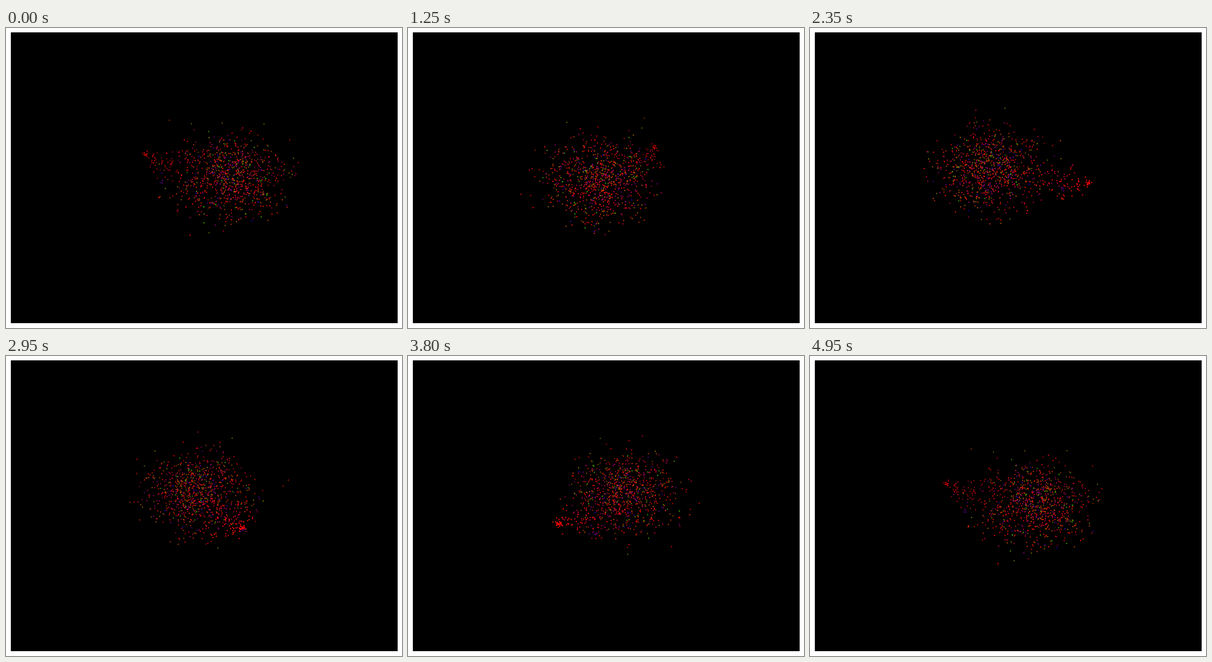
A matplotlib script that plays this animation: 819 px wide and 619 px high, repeating every 5 s.

```python
import numpy as np
import matplotlib.pyplot as plt
from matplotlib.animation import FuncAnimation
from matplotlib.patches import Rectangle

W, H, DPI = 819, 619, 100
FRAMES, INTERVAL = 100, 50
CENTER_X, CENTER_Y = 420, 306
ELEV = np.radians(22)
CAMERA = 2500  # camera distance in pixels

rng = np.random.default_rng(11)


def blob(n, center, sigma, hue, hue_sigma, shell=(0, 2.6)):
    """Gaussian blob of n points (x, y, z, hue) within a shell in sigmas."""
    unit = rng.normal(size=(400 * n if shell[0] else 3 * n, 3))
    radius = np.linalg.norm(unit, axis=1)
    unit = unit[(radius >= shell[0]) & (radius < shell[1])][:n]
    hues = np.clip(rng.normal(hue, hue_sigma, len(unit)), 0.08, 0.88)
    return np.column_stack([unit * sigma + center, hues])


CLOUD = (42, -25, 10), (56, 56, 42), .5, .17

points = np.vstack([
    blob(870, *CLOUD),
    blob(16, *CLOUD, shell=(2.6, 3)),
    # the tight tip and the loose arm that joins it to the cloud
    blob(14, (-135, 95, 10), 3.5, .5, .01),
    blob(20, (-122, 88, 4), (13, 13, 11), .49, .03),
    blob(40, (-85, 52, 10), (26, 24, 17), .43, .08),
    blob(4, (-82, 106, -11), 4, .52, .02),
    blob(5, (-100, 28, -23), (4, 4, 3), .2, .04),
    # loners far outside
    [(-83, 70, 98, .62), (-97, -162, 21, .56), (-96, -141, 14, .57),
     (-38, -127, -75, .49), (0, -35, -112, .75), (0, -90, 118, .74)],
])
px, py, pz, hue = points.T
colors = plt.get_cmap("brg")(hue)


def project(angle):
    """Screen positions and depth shaded colours, far points first."""
    side = px * np.cos(angle) + py * np.sin(angle)
    front = px * np.sin(angle) - py * np.cos(angle)
    near = front * np.cos(ELEV) + pz * np.sin(ELEV)
    up = pz * np.cos(ELEV) - front * np.sin(ELEV)
    scale = CAMERA / (CAMERA - near)
    xy = np.column_stack([CENTER_X + side * scale, CENTER_Y - up * scale])
    shaded = colors.copy()
    shaded[:, 3] = 0.4 + 0.6 * (near - near.min()) / np.ptp(near)
    order = np.argsort(near)
    return xy[order], shaded[order]


fig = plt.figure(figsize=(W / DPI, H / DPI), dpi=DPI, facecolor="white")
ax = fig.add_axes([0, 0, 1, 1])
ax.set_xlim(0, W)
ax.set_ylim(H, 0)
ax.axis("off")
ax.add_patch(Rectangle((10, 9), 800, 600, color="black", lw=0,
                       antialiased=False))
dots = ax.scatter(px, py, s=1, marker="o", linewidths=1)


def update(i):
    xy, shaded = project(2 * np.pi * i / FRAMES)
    dots.set_offsets(xy)
    dots.set_facecolor(shaded)
    dots.set_edgecolor(shaded)
    return (dots,)


anim = FuncAnimation(fig, update, frames=FRAMES, interval=INTERVAL,
                     repeat=True, repeat_delay=0, blit=False)
plt.show()
```
